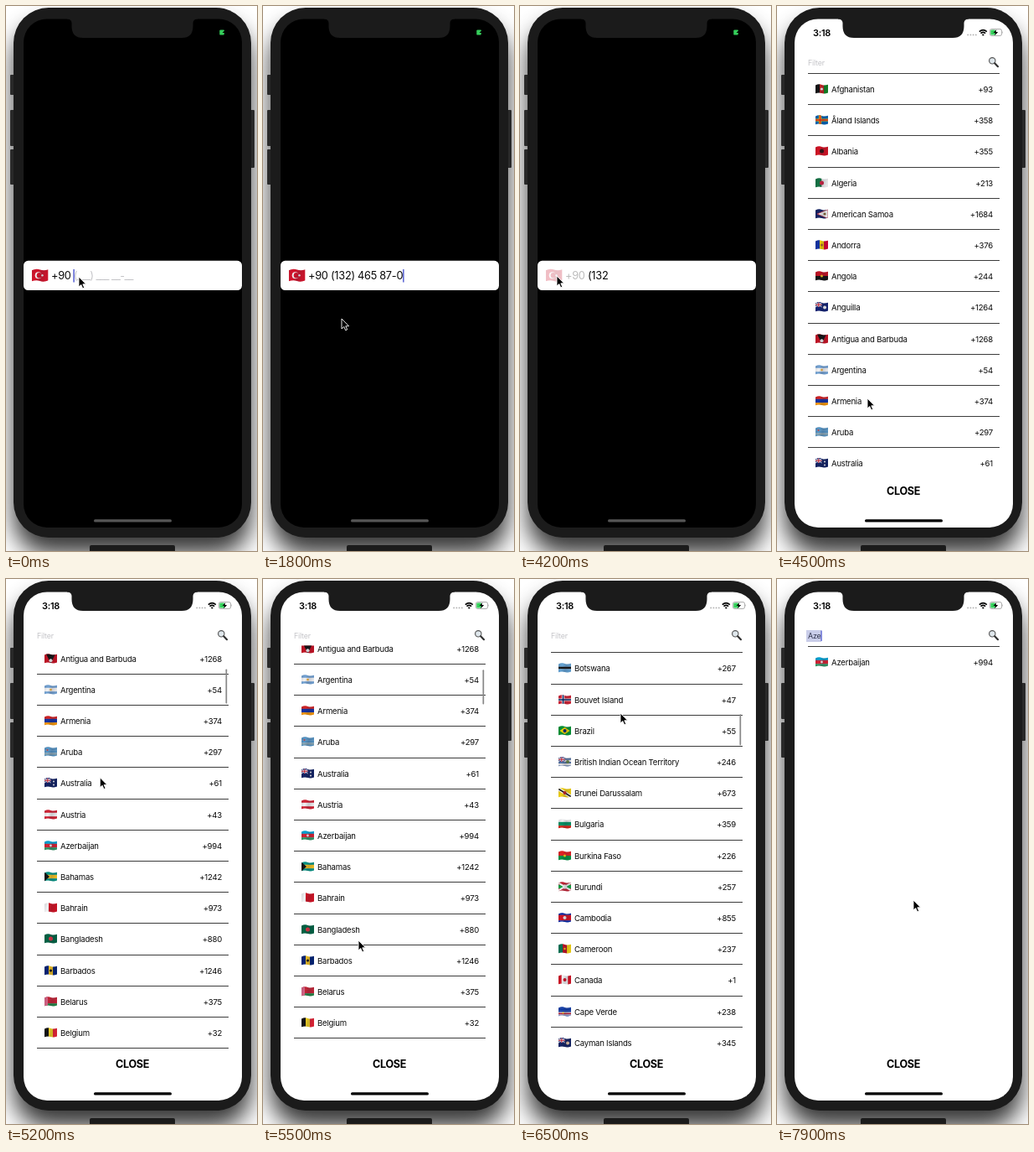
These frames come from a looping animation (300 px wide and 650 px high, 8 s). An HTML page:

```html
<!DOCTYPE html>
<html lang="en">
<head>
<meta charset="utf-8">
<title>Phone input with country picker</title>
<style>
html, body { margin: 0; width: 100%; height: 100%; overflow: hidden; background: #fff; }
svg { display: block; width: 100%; height: 100%; }
text { font-family: Inter, Roboto, sans-serif; white-space: pre; }
.row { font-size: 9.6px; letter-spacing: -.24px; fill: #0c0c0c; }
.num { font-size: 12.8px; letter-spacing: -.3px; fill: #0a0a0a; }
.mask { font-size: 12.8px; letter-spacing: -.55px; font-weight: 300; fill: #b4b4b8; }
.filter { font-size: 8.9px; letter-spacing: -.2px; }
</style>
</head>
<body>
<svg viewBox="0 0 300 650" id="stage"></svg>
<script>
const LOOP = 8000, ROW = 37.2, FIRST = 99;
const DIGITS = "1324658709";
const TYPED = [100, 500, 700, 900, 1050, 1200, 1350, 1500, 1800, 1900];
const ERASED = [3000, 3100, 3200, 3300, 3400, 3500, 3600];
const QUERY = [[7400, "A"], [7600, "Az"], [7800, "Aze"]];

// Scroll gestures: start, duration, distance
const FLICKS = [[4600, 880, 312], [5500, 600, 340.6], [6100, 1100, 463.2]];

// Pointer stops: time, x, y
const POINTER = [
  [0, 87, 323], [900, 87, 323], [1500, 94, 373], [3800, 94, 373], [4100, 44, 322],
  [4200, 44, 322], [4480, 108, 468], [4600, 108, 468], [4950, 112, 200], [5100, 112, 200],
  [5500, 114, 431], [5750, 117, 180], [5850, 117, 180], [6080, 116, 430], [6350, 120, 160],
  [6500, 120, 160], [6900, 58, 68], [7100, 58, 68], [7450, 163, 383], [LOOP, 163, 383]
];

// Name | dial code | flag recipe
const COUNTRIES = `Afghanistan|93|v,111,c22,182 o,fff,7.5,5.5,1.6
Åland Islands|358|h,06b n,fc0,d22
Albania|355|h,d12 o,311
Algeria|213|v,174,fff o,d24
American Samoa|1684|h,126 w,fff o,863,11,5.5,1.6
Andorra|376|v,13a,fd0,d03 o,b63,7.5,5.5,1.5
Angola|244|h,c12,111 o,fc2,7.5,5.5,1.5
Anguilla|1264|h,127 u o,fff,11,6,2
Antigua and Barbuda|1268|h,c12 y,111 o,fff,7.5,7.8,2
Argentina|54|h,7ad,fff,7ad o,fb3,7.5,5.5,1.3
Armenia|374|h,d22,13a,f90
Aruba|297|h,59c,59c,59c,8ab,59c o,c44,3.5,3.5,1
Australia|61|h,126 u o,fff,11,4,1 o,fff,11,8,1
Austria|43|h,d23,fff,d23
Azerbaijan|994|h,0ad,d23,396 o,fff,7.5,5.5,1.4
Bahamas|1242|h,098,fc2,098 t,111
Bahrain|973|v,fff,d12,d12
Bangladesh|880|h,064 o,e34
Barbados|1246|v,027,fc2,027 o,111,7.5,5.5,1.6
Belarus|375|h,c23,c23,284 b,d68
Belgium|32|v,111,fd2,e23
Belize|501|h,c12,039,039,039,039,c12 o,fff
Benin|229|h,fd1,e12 b,085
Bermuda|1441|h,c12 u o,fff,11,6,2
Bhutan|975|h,fc2,f62 o,fff
Bolivia|591|h,d22,fe0,073
Bosnia and Herzegovina|387|h,029 y,fc0
Botswana|267|h,6ad,6ad,111,6ad,6ad
Bouvet Island|47|h,d23 n,fff,026
Brazil|55|h,093 d,fd0 o,027,7.5,5.5,2
British Indian Ocean Territory|246|h,eee,57a,eee,57a,eee,57a u o,684,11,5.5,2
Brunei Darussalam|673|h,fd1 x,fff x,111,1.5 o,c22,7.5,5.5,2
Bulgaria|359|h,fff,096,d21
Burkina Faso|226|h,e22,094 o,fd1,7.5,5.5,1.6
Burundi|257|h,c23,1a4,c23 x,fff,2 z,fff,2 o,fff
Cambodia|855|h,02a,d12,d12,02a o,fff,7.5,5.5,2
Cameroon|237|v,075,c12,fd1 o,fd1,7.5,5.5,1.2
Canada|1|v,d12,fff,fff,d12 o,d12,7.5,5.5,2
Cape Verde|238|h,03a,03a,03a,03a,aac,c23,aac,03a o,fd2,5.5,7,1
Cayman Islands|345|h,126 u o,eca,11,6,2
Central African Republic|236|h,038,fff,293,fc0 o,d12
Chad|235|v,026,fc0,c02
Chile|56|h,fff,d32 k,03a
China|86|h,d22 o,fd0,4,4,2`.split("\n").map(line => {
  const [name, code, flag] = line.split("|");
  return { name, code, flag };
});
const TURKEY = "h,e1122a o,fff,6,5.5,3 o,e1122a,6.9,5.5,2.4 o,fff,9.6,5.5,.9";

const rect = (x, y, w, h, fill, r = 0) =>
  `<rect x="${x}" y="${y}" width="${w}" height="${h}" rx="${r}" fill="${fill}"/>`;
const path = (d, fill, extra = "") => `<path d="${d}" fill="${fill}" ${extra}/>`;
const line = (d, stroke, w) => path(d, "none", `stroke="${stroke}" stroke-width="${w}"`);
const circle = (x, y, r, fill) => `<circle cx="${x}" cy="${y}" r="${r}" fill="${fill}"/>`;
const text = (x, y, s, attrs) => `<text x="${x}" y="${y}" ${attrs}>${s}</text>`;

// Flag parts on a 15 x 11 field
const stripes = (cols, across) => cols.map((c, i) => {
  const w = 15 / cols.length, h = 13 / cols.length;
  return across ? rect(i * w, -1, w + .1, 13, "#" + c) : rect(0, i * h - 1, 15, h + .1, "#" + c);
}).join("");
const PARTS = {
  h: (...cols) => stripes(cols, false),
  v: (...cols) => stripes(cols, true),
  o: (c, x = 7.5, y = 5.5, r = 2.5) => circle(x, y, r, "#" + c),
  n: (a, b) => line("M0 5.5H15M5.5 -1V12", "#" + a, 3.2) + line("M0 5.5H15M5.5 -1V12", "#" + b, 1.5),
  t: c => path("M0 0L6 5.5L0 11Z", "#" + c),
  w: c => path("M15 0L2 5.5L15 11Z", "#" + c, 'stroke="#c23" stroke-width=".7"'),
  y: c => path("M2 0H13L7.5 11Z", "#" + c),
  d: c => path("M1.5 5.5L7.5 1.3L13.5 5.5L7.5 9.7Z", "#" + c),
  b: c => rect(0, -1, 4, 13, "#" + c),
  k: c => rect(0, -1, 5, 6.5, "#" + c),
  x: (c, w = 4) => line("M0 1L15 10", "#" + c, w),
  z: (c, w = 4) => line("M0 10L15 1", "#" + c, w),
  u: () => rect(0, -1, 7.5, 6.5, "#127") + line("M0 0L7.5 5.5M0 5.5L7.5 0", "#fff", 1) +
    line("M3.75 0V5.5M0 2.75H7.5", "#fff", 1.8) + line("M3.75 0V5.5M0 2.75H7.5", "#c23", 1)
};
const flag = (recipe, x, y, k = 1) =>
  `<g transform="translate(${x} ${y}) scale(${k})"><g clip-path="url(#wave)">` +
  recipe.split(" ").map(p => {
    const [kind, ...args] = p.split(",");
    return PARTS[kind](...args);
  }).join("") + rect(0, -1, 15, 13, "url(#cloth)") + "</g></g>";

const rowMarkup = c => `<g class="row">${rect(37, -19, 229, 1, "#3c3c3c")}${flag(c.flag, 46, -5.5)}` +
  text(65, 3.5, c.name, "") + text(258, 3.5, "+" + c.code, 'text-anchor="end"') + "</g>";

const BODY = "#1b1b1b";
const stage = document.getElementById("stage");
stage.innerHTML = `
<defs>
  <clipPath id="wave"><path d="M0 1Q4 -.9 7.5 .4T15 .2V10Q11 11.8 7.5 10.6T0 10.8Z"/></clipPath>
  <clipPath id="screen"><rect x="21" y="15.4" width="261" height="606.6" rx="28"/></clipPath>
  <clipPath id="list"><rect x="30" y="79.5" width="245" height="480.5"/></clipPath>
  <linearGradient id="cloth" x2="1" y2=".25">
    <stop offset="0" stop-color="#223" stop-opacity=".2"/>
    <stop offset=".35" stop-color="#223" stop-opacity=".06"/>
    <stop offset=".65" stop-color="#223" stop-opacity=".24"/>
    <stop offset="1" stop-color="#223" stop-opacity=".12"/>
  </linearGradient>
  <filter id="soft" x="-30%" y="-30%" width="160%" height="160%"><feGaussianBlur stdDeviation="14"/></filter>
</defs>
${rect(0, 0, 300, 650, "#fff")}
<g filter="url(#soft)" opacity=".78">${rect(9, 22, 284, 632, "#000", 43)}</g>
${rect(5, 82, 6, 24, "#292929", 1)}${rect(5, 124, 6, 43, "#292929", 1)}${rect(5, 171, 6, 42, "#292929", 1)}
${rect(291, 124, 6, 69, "#292929", 1)}
${rect(9, 2, 284, 632, BODY, 42)}
${rect(100, 643, 102, 12, BODY, 2)}
<g clip-path="url(#screen)">
  ${rect(21, 15, 261, 607, "#000")}
  ${rect(21, 303.8, 261, 35.3, "#fff", 5.5)}
  <g id="country">${flag(TURKEY, 30.7, 314, 1.33)}${text(54, 326.3, "+90", 'class="num"')}</g>
  ${text(81, 326.3, "(___) ___ __-__", 'id="mask" class="mask"')}
  ${text(81, 326.3, "", 'id="num" class="num"')}
  <rect id="caret" y="314" width="1.4" height="15.5" fill="#4a54cf"/>
  <g id="modal">
    ${rect(21, 15, 261, 640, "#fff")}
    <rect id="mark" x="35" y="61" width="18" height="14" fill="#c9cde9"/>
    ${text(37, 71, "", 'id="query" class="filter"')}
    <rect id="filterCaret" y="61.5" width="1.2" height="12.5" fill="#4a54cf"/>
    ${circle(257.3, 65.3, 3.7, "#dfe7ec")}
    <circle cx="257.3" cy="65.3" r="3.7" fill="none" stroke="#555" stroke-width="1.1"/>
    <path d="M260.2 68.3L264 72.2" stroke="#333" stroke-width="2.2" stroke-linecap="round"/>
    <g clip-path="url(#list)" id="rows">${COUNTRIES.map(rowMarkup).join("")}</g>
    <rect id="bar" x="262.5" width="1.7" rx=".85" fill="#858585"/>
    ${text(151, 583.4, "CLOSE", 'text-anchor="middle" font-size="12.6" font-weight="700" letter-spacing="-.3" fill="#000"')}
  </g>
  ${text(43, 36, "3:18", 'font-size="11" font-weight="600" letter-spacing="-.3"')}
  ${[0, 1, 2, 3].map(i => circle(228.2 + i * 3.2, 34.4, .95, "rgba(0,0,0,.3)")).join("")}
  ${line("M241.8 30.6Q246.3 26.6 250.8 30.6M243.5 32.6Q246.3 30.1 249.1 32.6", "#000", 1.6)}
  ${path("M244.8 34L246.3 35.8L247.8 34Q246.3 32.9 244.8 34Z", "#000")}
  <rect x="254.4" y="27.5" width="14.2" height="8" rx="2.2" fill="none" stroke="rgba(0,0,0,.4)" stroke-width=".8"/>
  ${path("M269.4 30V33Q270.6 31.5 269.4 30Z", "rgba(0,0,0,.4)")}
  ${rect(255.3, 28.4, 5.8, 6.2, "#35cf5b", 1.2)}
  ${path("M262.3 27.9L258.6 32H261L260.2 35.2L264.2 31H261.6Z", "#000")}
  <rect id="home" x="105" y="612.3" width="93" height="3.2" rx="1.6"/>
</g>
${path("M73 14V15.4Q78 15.4 78.5 20V24Q78.5 38 92 38H210Q223.5 38 223.5 24V20Q224 15.4 229 15.4V14Z", BODY)}
<path id="pointer" d="M0 0V12L2.8 9.5L4.7 13.8L6.7 12.9L4.8 8.8H8.6Z" fill="#000" stroke="#fff" stroke-width=".9" stroke-linejoin="round"/>`;

const el = {};
stage.querySelectorAll("[id]").forEach(n => el[n.id] = n);
const rows = [...el.rows.children];

const clamp = u => Math.min(1, Math.max(0, u));
const span = (t, a, b) => clamp((t - a) / (b - a));
const easeOut = u => 1 - (1 - u) ** 3;
const smooth = u => u * u * (3 - 2 * u);
const passed = (times, t) => times.filter(a => a <= t).length;
const show = (node, opacity) => node.setAttribute("opacity", opacity);
const move = (node, x, y) => node.setAttribute("transform", `translate(${x} ${y})`);

function pointerAt(t) {
  const i = Math.max(1, POINTER.findIndex(p => p[0] > t));
  const [a, x0, y0] = POINTER[i - 1], [b, x1, y1] = POINTER[i];
  const u = smooth(span(t, a, b));
  return [x0 + (x1 - x0) * u, y0 + (y1 - y0) * u];
}

function format(d) {
  let s = "(" + d.slice(0, 3);
  if (d.length > 3) s += ") " + d.slice(3, 6);
  if (d.length > 6) s += " " + d.slice(6, 8);
  if (d.length > 8) s += "-" + d.slice(8);
  return s;
}

function drawField(t) {
  const digits = DIGITS.slice(0, passed(TYPED, t) - passed(ERASED, t));
  el.num.textContent = digits ? format(digits) : "";
  show(el.mask, digits ? 0 : 1);
  el.caret.setAttribute("x", digits ? 81 + el.num.getComputedTextLength() : 80.4);
  show(el.caret, t < 3000 ? 1 - span(t, 2150, 2400) : 1 - span(t, 3700, 3850));
  show(el.country, 1 - .73 * span(t, 4080, 4180));
}

function drawPicker(t) {
  const slide = easeOut(span(t, 4220, 4490));
  move(el.modal, 0, 607 * (1 - slide));
  show(el.modal, slide ? 1 : 0);
  el.home.setAttribute("fill", slide > .15 ? "#000" : "#565656");

  const query = QUERY.reduce((q, [at, s]) => at <= t ? s : q, "");
  const scroll = query ? 0 : FLICKS.reduce((s, [a, d, dist]) => s + dist * easeOut(span(t, a, a + d)), 0);
  let slot = 0;
  rows.forEach((row, i) => {
    const hit = COUNTRIES[i].name.toLowerCase().includes(query.toLowerCase());
    row.style.display = hit ? "" : "none";
    // Whole pixels keep the rules crisp
    if (hit) move(row, 0, Math.round(FIRST + ROW * slot++ - scroll));
  });

  el.bar.setAttribute("y", 84 + .0775 * scroll);
  el.bar.setAttribute("height", 43 - .006 * scroll);
  show(el.bar, query ? 0 : span(t, 4600, 4700) * (1 - span(t, 7100, 7300)));

  el.query.textContent = query || "Filter";
  el.query.setAttribute("fill", query ? "#32364f" : "#c4c4c8");
  el.filterCaret.setAttribute("x", query ? 37 + el.query.getComputedTextLength() : 36.5);
  show(el.filterCaret, t >= 6950 ? 1 : 0);
  show(el.mark, query === "Aze" ? 1 : 0);
}

function draw(t) {
  drawField(t);
  drawPicker(t);
  move(el.pointer, ...pointerAt(t));
}

const start = performance.now();
function tick(now) {
  draw(Math.max(0, now - start) % LOOP);
  requestAnimationFrame(tick);
}
draw(0);
requestAnimationFrame(tick);
</script>
</body>
</html>
```
